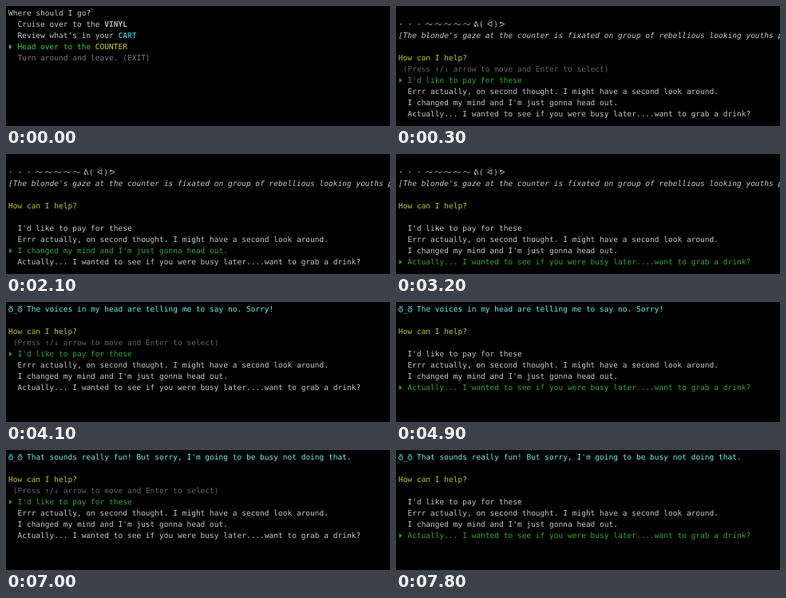
Recreate the animation shown at these times as an HTML page. Size 481 by 150 pixels, loop 8 s.

```html
<!DOCTYPE html>
<html lang="en">
<head>
<meta charset="utf-8">
<style>
  html, body { margin: 0; width: 100%; height: 100%; overflow: hidden; background: #000; }
  svg { display: block; width: 481px; height: 150px; background: #000; }
  text {
    font: 9.52px "DejaVu Sans Mono", monospace;
    white-space: pre;
    text-rendering: geometricPrecision;
  }
  .runner { font-family: "DejaVu Sans", sans-serif; }
  .story { font-style: italic; }
  .bold { font-weight: bold; }
</style>
</head>
<body>
<svg id="screen" viewBox="0 0 481 150"></svg>
<script>
const LOOP = 8000, LEFT = 3, CELL = 5.731, LINE = 14, BASE = 12.3;
const WHITE = '#c4c4c4', GREEN = '#2fa62f', BRIGHT_GREEN = '#36cc36',
      YELLOW = '#c2bf2c', CYAN = '#68ecee', GREY = '#626262';
const screen = document.getElementById('screen');

const col = n => LEFT + n * CELL;
const baseline = row => BASE + row * LINE;
const text = (x, row, content, color, cls = '') =>
  `<text x="${x}" y="${baseline(row)}" fill="${color}" class="${cls}">${content}</text>`;
const span = (content, color, cls = '') =>
  `<tspan fill="${color}" class="${cls}">${content}</tspan>`;

const pointer = (row, color) =>
  `<path d="M4.2 ${baseline(row) - 5.7}l2.3 2.4l-2.3 2.4" fill="${color}" stroke="${color}" stroke-width="1.1"/>`;

const menu = (row, items, selected, color) => items.map((item, i) =>
  text(col(2), row + i, item, i === selected ? color : WHITE) +
  (i === selected ? pointer(row + i, color) : '')).join('');

function shop(exitColor) {
  return text(LEFT, 0, 'Where should I go?', WHITE) + menu(1, [
    'Cruise over to the ' + span('VINYL', '#b8b4b8', 'bold'),
    "Review what's in your " + span('CART', '#35a9b2', 'bold'),
    'Head over to the ' + span('COUNTER', '#d0cc48'),
    span('Turn around and leave. (EXIT)', exitColor)
  ], 2, BRIGHT_GREEN);
}

function counter(row, selected) {
  const hint = ' (Press ↑/↓ arrow to move and Enter to select)';
  return text(LEFT, row, 'How can I help?', YELLOW) +
    (selected === 0 ? text(LEFT, row + 1, hint, GREY) : '') +
    menu(row + 2, [
      "I'd like to pay for these",
      'Errr actually, on second thought. I might have a second look around.',
      "I changed my mind and I'm just gonna head out.",
      'Actually... I wanted to see if you were busy later....want to grab a drink?'
    ], selected, GREEN);
}

function arrival(selected) {
  let trail = '';
  for (let i = 0; i < 3; i++)
    trail += `<circle cx="${6 + i * 11.4}" cy="22.8" r=".8" fill="${WHITE}"/>`;
  for (let i = 0; i < 5; i++)
    trail += `<path d="M${37 + i * 11.8} 23.6c2-3 3.4-1.6 4.4-.8s2.6 1.6 4.2-1" fill="none" stroke="${WHITE}" stroke-width=".9"/>`;
  const runner = [[97, 'ᕕ'], [105, '('], [114, 'ᐛ'], [123, ')'], [129.5, 'ᕗ']]
    .map(([x, glyph]) => text(x, 1, glyph, WHITE, 'runner')).join('');
  const story = "[The blonde's gaze at the counter is fixated on group of rebellious looking youths p";
  return trail + runner + text(LEFT, 2, story, WHITE, 'story') + counter(4, selected);
}

const eye = x =>
  `<g fill="none" stroke="${CYAN}" stroke-width=".9"><circle cx="${x}" cy="9.8" r="2.5"/>` +
  `<path d="M${x - 2} 5.8h2.4q.4 1.4 2.2-.7"/><circle cx="${x}" cy="9.8" r=".3"/></g>`;

const reply = (line, selected) =>
  eye(6) + text(col(1), 0, '_', CYAN) + eye(17.5) +
  text(col(4), 0, line, CYAN) + counter(2, selected);

const voices = n => reply('The voices in my head are telling me to say no. Sorry!', n);
const busy = n => reply("That sounds really fun! But sorry, I'm going to be busy not doing that.", n);

// Each step: start time in ms, scene, argument.
const steps = [
  [0, shop, '#7d777d'], [100, shop, WHITE],
  [300, arrival, 0], [1900, arrival, 1], [2100, arrival, 2], [2700, arrival, 3],
  [3300, voices, 0], [4500, voices, 1], [4600, voices, 2], [4700, voices, 3],
  [5000, busy, 0], [7400, busy, 1], [7500, busy, 2], [7700, busy, 3]
];

let shown;
function draw() {
  const time = performance.now() % LOOP;
  const step = steps.findLast(([start]) => start <= time);
  if (step !== shown) {
    shown = step;
    screen.innerHTML = step[1](step[2]);
  }
  requestAnimationFrame(draw);
}
draw();
</script>
</body>
</html>
```
